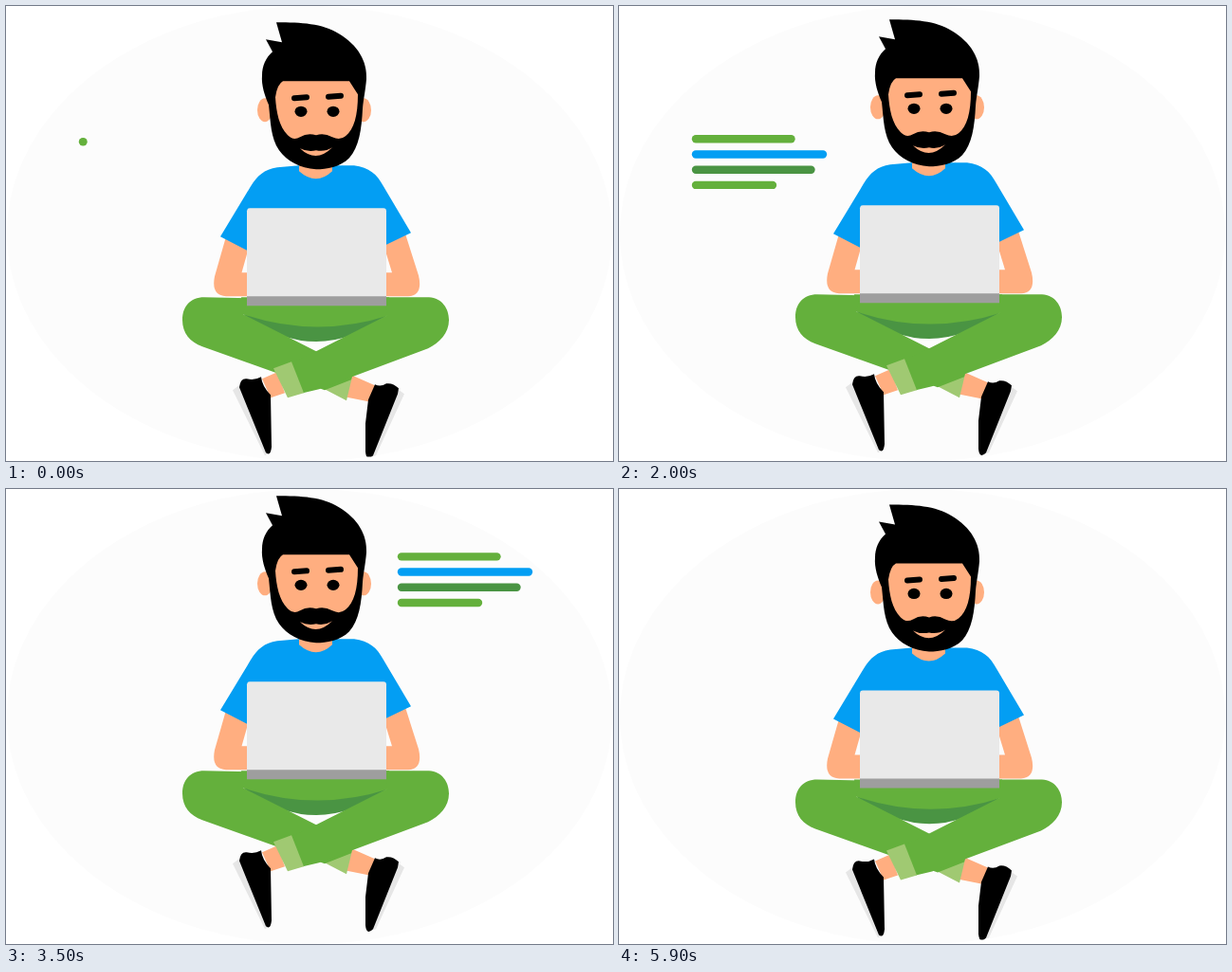
An HTML page that plays this animation: 640 by 480 pixels, repeating every 6000 ms.

```html
<!DOCTYPE html>
<html lang="en">
<head>
<meta charset="utf-8">
<title>Coding</title>
<style>
  html, body { margin: 0; width: 100%; height: 100%; overflow: hidden; background: #fff; }
  svg { display: block; width: 100vw; height: 100vh; }
  .skin { fill: #ffae80; }
  .shirt { fill: #039ef3; }
  .pants { fill: #64b03c; }
  .shade { fill: #4a9443; }
  .cuff { fill: #a0c972; }
  .sole { fill: #e6e6e6; }
  .code line { stroke-width: 8.4; stroke-linecap: round; }
</style>
</head>
<body>
<svg viewBox="0 0 640 480">
  <clipPath id="floor"><path d="M0 -40H640V475.5H320V478H0Z"/></clipPath>
  <ellipse cx="320" cy="240" rx="319" ry="240" fill="#fcfcfc"/>
  <g clip-path="url(#floor)">
    <g id="float">
      <g class="code" id="code"></g>

      <!-- feet -->
      <path class="skin" d="M270 393L286 386L294 408L279 413ZM364 389L389 400L382 417L357 412Z"/>
      <path class="sole" d="M239 405L247 399L278 471L273 474ZM413 404L420 409L390 474L384 476Z"/>
      <path d="M246 402Q247 392 254 393Q262 395 269 391Q270 401 279 410L280 465Q279 475 274 471Z"/>
      <path d="M382 415L389 399Q395 402 401 398Q408 397 414 403L413 409L387 474Q380 481 379 470L379 440Z"/>

      <!-- legs -->
      <path class="cuff" d="M334 403L365 391L359 416Z"/>
      <path class="shade" d="M250 325Q327 382 402 326Z"/>
      <path class="pants" d="M248 307H404V326Q327 351 250 325Z"/>
      <path class="pants" d="M256 308L250 325L327 364L366 387L364 394L336 405L207 359C194 354 186 345 186 331C186 317 194 307 209 307Z"/>
      <path class="pants" d="M400 307H446C460 308 467 319 467 331C467 345 457 355 445 361L330 404L313 408L301 376L327 364L402 326Z"/>
      <path class="cuff" d="M282 382L301 375L314 408L297 413Z"/>

      <!-- arms and shirt -->
      <path class="skin" d="M232 243L220 285Q216 305 232 306H256V281H248.500L255 258V245ZM421 240L435 284Q440 305 424 306H399V281H407L400 258V245Z"/>
      <path class="shirt" d="M309 168L286 170C272 172 265 179 258 190L226 243L255 258V300H400V252L427 239L398 190C391 177 383 170 367 168Z"/>
      <path class="skin" d="M309 160V174Q327 190 344 174V160Z"/>

      <!-- laptop -->
      <path fill="#e9e9e9" d="M254 310V216Q254 213 257 213H398Q401 213 401 216V310Z"/>
      <path fill="#9e9e9e" d="M254 306H401V316H254Z"/>

      <!-- head -->
      <ellipse class="skin" cx="273" cy="109.500" rx="8" ry="12.500"/>
      <ellipse class="skin" cx="377" cy="109.500" rx="8" ry="12.500"/>
      <path d="M285 17C312 17 333 18 351 29C371 41 381 58 380 77C379 89 377 97 376 108C375 130 372 149 362 160C352 170 338 172 327 172C310 171 296 163 288 152C279 139 279 122 277 104C273 95 269 83 270 73C270 63 274 54 281 48L274 35L291 38Z"/>
      <path class="skin" d="M292 79H362L371 93C371 115 367 130 358 137Q352 142 344 138Q335 133 327 136Q318 133 310 138Q303 142 297 136C288 127 285 112 284 96Q286 82 292 79Z"/>
      <path class="skin" d="M310 150Q327 166 344 149Q336 154 327 152Q318 154 310 150Z"/>
      <path d="M304 97L317 96M340 95.500L353 94.500" fill="none" stroke="#000" stroke-width="6" stroke-linecap="round"/>
      <g id="eyes">
        <ellipse cx="311" rx="6.500" ry="5.600"/>
        <ellipse cx="345" rx="6.500" ry="5.600"/>
      </g>
    </g>
  </g>
</svg>
<script>
const LOOP = 6000, STEP = 100, CYCLE = 4000, LINE = 266;
const floating = document.getElementById('float');
const eyes = document.getElementById('eyes');
const code = document.getElementById('code');

const rows = [[100, '#64b03c'], [133.5, '#039ef3'], [121, '#4a9443'], [80.5, '#64b03c']];
const blocks = [
  { x: 81, y: 143, write: 0, erase: 2150 },
  { x: 417, y: 81, write: 2105, erase: 4331 }
];

const lines = blocks.flatMap(b => rows.map(([len, color], i) => {
  const el = document.createElementNS('http://www.w3.org/2000/svg', 'line');
  const y = b.y + i * 16.2;
  el.setAttribute('y1', y);
  el.setAttribute('y2', y);
  el.setAttribute('stroke', color);
  code.append(el);
  return { el, x: b.x, len, write: b.write + i * LINE, erase: b.erase + i * LINE };
}));

function ease(p) {
  p = Math.min(1, Math.max(0, p));
  return p < 0.5 ? 2 * p * p : 1 - 2 * (1 - p) ** 2;
}

function draw(t) {
  const dy = -1.2 - 13.5 * Math.cos((t - 2930) / CYCLE * 2 * Math.PI);
  floating.setAttribute('transform', `translate(0 ${dy.toFixed(2)})`);

  const blink = Math.min(1, 0.1 + 0.0075 * Math.abs(t % CYCLE - 845));
  eyes.setAttribute('transform', `translate(0 111) scale(1 ${blink})`);

  for (const { el, x, len, write, erase } of lines) {
    const shown = t >= write && t < erase + LINE;
    el.setAttribute('visibility', shown ? 'visible' : 'hidden');
    el.setAttribute('x1', x + len * ease((t - erase) / LINE));
    // A hair of length keeps the round cap visible at the start
    el.setAttribute('x2', x + 0.5 + len * ease((t - write) / LINE));
  }
}

function tick() {
  draw(Math.floor(performance.now() % LOOP / STEP) * STEP);
  requestAnimationFrame(tick);
}
tick();
</script>
</body>
</html>
```
